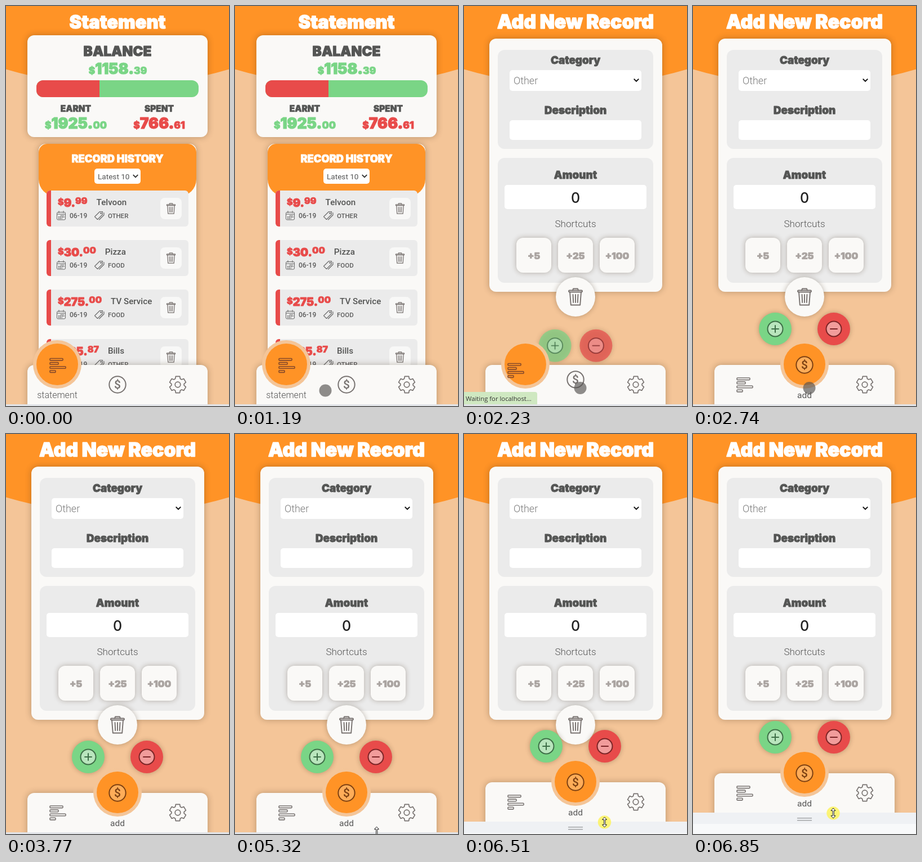
These frames come from a looping animation (396x711 px, 8000 ms). An HTML page with a canvas:

```html
<!DOCTYPE html>
<html lang="en">
<head>
<meta charset="utf-8">
<title>Budget tracker</title>
<style>
html, body { margin: 0; width: 100%; height: 100%; overflow: hidden; background: #f5c598; }
canvas { display: block; width: 396px; height: 711px; }
</style>
</head>
<body>
<canvas id="stage" width="396" height="711"></canvas>
<script>
const ctx = document.getElementById('stage').getContext('2d');
const LOOP = 8000;
const ORANGE = '#ff9326', PEACH = '#f4c598', PAPER = '#faf9f7', PANEL = '#ebebeb';
const RED = '#e84b4a', GREEN = '#7ad586', DARK = '#545554', ICON = '#777270';
const HEAVY = 'Inter, sans-serif', BODY = 'Roboto, sans-serif';

// The screen refreshes only at these moments.
const TICKS = [0, 2230, 2390, 2570, 2740, 6000, 6160, 6350, 6510, 6680, 6850];

// Pointer states: time, x, y, kind
const POINTER = [
  [0, 0, 0, ''], [1030, 99.5, 679.5, 'touch'], [1190, 160.5, 683.5, 'touch'],
  [1360, 190.5, 683, 'touch'], [1540, 216.5, 682.5, 'touch'], [1890, 206.5, 678.5, 'touch'],
  [2060, 206, 678.5, 'press'], [2230, 206.5, 679, 'touch'], [3250, 225.5, 686.5, 'touch'],
  [3420, 245.5, 699.5, 'touch'], [3600, 250.5, 704.5, 'touch'], [3770, 0, 0, ''],
  [4620, 253.5, 708, 'resize'], [4800, 253.5, 707.5, 'drag'], [5320, 251.5, 707, 'resize'],
  [5820, 251, 708, 'drag'], [6160, 250, 704, 'drag'], [6350, 250, 697, 'drag'],
  [6510, 249.5, 690, 'drag'], [6680, 249, 680, 'drag'], [6850, 249, 674, 'drag']
];

// How far the bottom edge has been dragged up: time, pixels
const DRAG = [[0, 0], [6000, 1], [6160, 5], [6350, 12], [6510, 19], [6680, 29], [6850, 35]];

const latest = (rows, t) => rows.filter(row => row[0] <= t).pop();
const clamp = v => Math.min(1, Math.max(0, v));
const mix = (a, b, p) => a + (b - a) * p;

function box(x, y, w, h, r, fill, blur = 0) {
  ctx.save();
  ctx.shadowColor = 'rgba(60,40,20,0.32)';
  ctx.shadowBlur = blur;
  ctx.fillStyle = fill;
  ctx.beginPath();
  ctx.roundRect(x, y, w, h, r);
  ctx.fill();
  ctx.restore();
}

function disc(x, y, r, fill, blur = 0) {
  box(x - r, y - r, 2 * r, 2 * r, r, fill, blur);
}

function ring(x, y, r) {
  ctx.beginPath();
  ctx.arc(x, y, r, 0, 2 * Math.PI);
  ctx.stroke();
}

function outline(x, y, w, h, r) {
  ctx.beginPath();
  ctx.roundRect(x, y, w, h, r);
  ctx.stroke();
}

function lines(...paths) {
  ctx.beginPath();
  for (const path of paths) {
    for (let i = 0; i < path.length; i += 2) {
      ctx[i ? 'lineTo' : 'moveTo'](path[i], path[i + 1]);
    }
  }
  ctx.stroke();
}

function text(str, x, y, size, color, weight = 400, align = 'left', family = BODY) {
  ctx.font = `${weight} ${size}px ${family}`;
  ctx.textAlign = align;
  ctx.fillStyle = color;
  ctx.fillText(str, x, y);
}

function heavy(str, x, y, size, color, align = 'center') {
  text(str, x, y, size, color, 900, align, HEAVY);
  ctx.strokeStyle = color;
  ctx.lineWidth = size * 0.045;
  ctx.lineJoin = 'round';
  ctx.strokeText(str, x, y);
  return ctx.measureText(str).width;
}

function heavyWidth(str, size) {
  ctx.font = `900 ${size}px ${HEAVY}`;
  return ctx.measureText(str).width;
}

function money(x, y, whole, cents, color, big, small, lift = 0) {
  x += heavy('$', x, y - lift * 0.6, small, color, 'left');
  x += heavy(whole + '.', x, y, big, color, 'left');
  return x + heavy(cents, x, y - lift, small, color, 'left');
}

function moneyCentred(cx, y, whole, cents, color) {
  const width = heavyWidth('$' + cents, 17.3) + heavyWidth(whole + '.', 26.7);
  money(cx - width / 2, y, whole, cents, color, 26.7, 17.3);
}

// Runs an icon drawing in its own coordinate system around (x, y).
function icon(x, y, color, width, drawing, scale = 1) {
  ctx.save();
  ctx.translate(x, y);
  ctx.scale(scale, scale);
  ctx.strokeStyle = color;
  ctx.lineWidth = width;
  ctx.lineJoin = ctx.lineCap = 'round';
  drawing();
  ctx.restore();
}

function bin() {
  outline(-12, -11.5, 24, 3, 1.2);
  lines([-5, -11.5, -4, -14.5, 4, -14.5, 5, -11.5],
    [-10, -8.5, -8.2, 14.5, 8.2, 14.5, 10, -8.5],
    [-4.5, -4, -3.8, 10], [0, -4, 0, 10], [4.5, -4, 3.8, 10]);
}

function calendar() {
  outline(-7.5, -6, 15, 13.5, 2);
  lines([-7.5, -2.5, 7.5, -2.5], [-4, -8, -4, -5], [4, -8, 4, -5]);
  ctx.setLineDash([2, 1]);
  ctx.lineCap = 'butt';
  ctx.lineWidth = 1.6;
  lines([-1, 0, 5.5, 0], [-5, 2.6, 5.5, 2.6], [-5, 5.2, 2, 5.2]);
}

function tag() {
  lines([-8, 2, 1, -7, 6, -7, 6, -2, -3, 7, -8, 2], [8.5, -5, 8.5, -1, 0, 7.5]);
  ring(3.2, -4.2, 1);
}

function bars() {
  [23, 15, 28, 10].forEach((w, i) => outline(-13, -12 + i * 7.1, w, 3.6, 1));
}

function gear() {
  ctx.beginPath();
  for (let i = 0; i < 6; i++) {
    for (const [offset, r] of [[-23, 11.3], [-14, 15], [14, 15], [23, 11.3]]) {
      const a = (i * 60 - 90 + offset) * Math.PI / 180;
      ctx.lineTo(r * Math.cos(a), r * Math.sin(a));
    }
  }
  ctx.closePath();
  ctx.stroke();
  ring(0, 0, 4.8);
}

function coin() {
  ring(0, 0, 14.7);
  text('$', 0, 7.2, 21, ctx.strokeStyle, 500, 'center');
}

function chevron(x, y, size, color) {
  icon(x, y, color, 2, () => lines([-size, -size / 2, 0, size / 2, size, -size / 2]));
}

function backdrop(title, size) {
  ctx.fillStyle = PEACH;
  ctx.fillRect(0, 0, 396, 711);
  ctx.fillStyle = ORANGE;
  ctx.beginPath();
  ctx.moveTo(0, 0);
  ctx.lineTo(0, 112.5);
  ctx.quadraticCurveTo(198, 171, 396, 112.5);
  ctx.lineTo(396, 0);
  ctx.fill();
  heavy(title, 198, 40, size, '#fff');
}

function record(y, whole, cents, name, kind) {
  box(72, y, 252, 64, 6, PANEL);
  box(72, y, 8, 64, [6, 0, 0, 6], RED);
  const end = money(92, y + 29, whole, cents, RED, 20, 16, 5);
  text(name, end + 16, y + 26, 15.2, DARK, 500);
  icon(98, y + 44.5, '#666', 1, calendar);
  text('06-19', 113, y + 49, 12, '#5c5c5c', 500);
  icon(165.5, y + 44.5, '#666', 1.1, tag);
  text(kind, 181, y + 49, 11.5, '#5c5c5c', 500);
  box(274, y + 13, 38, 38, 8, '#f8f8f7');
  icon(293, y + 32, '#77716f', 2, bin, 0.63);
}

function statementPage() {
  backdrop('Statement', 32.5);
  box(38, 52, 320, 181, 12, PAPER, 12);
  heavy('BALANCE', 198, 89, 24.4, DARK);
  moneyCentred(198.5, 121, '1158', '39', GREEN);
  box(54, 132, 288, 30, 12, GREEN);
  box(54, 132, 112, 30, [12, 0, 0, 12], RED);
  heavy('EARNT', 124, 188, 15.4, DARK);
  heavy('SPENT', 272, 188, 15.4, DARK);
  moneyCentred(124, 218, '1925', '00', GREEN);
  moneyCentred(272, 218, '766', '61', RED);

  box(58, 245, 280, 450, 12, PAPER, 12);
  box(58, 245, 280, 93, [15, 15, 30, 30], ORANGE);
  heavy('RECORD HISTORY', 198, 278, 18.3, '#fff');
  box(157, 289, 82, 27, 5, '#fff');
  text('Latest 10', 163, 308, 13.6, '#555');
  chevron(230, 302.5, 3.7, '#333');

  record(328, '9', '99', 'Telvoon', 'OTHER');
  record(416, '30', '00', 'Pizza', 'FOOD');
  record(504, '275', '00', 'TV Service', 'FOOD');
  record(592, '125', '87', 'Bills', 'OTHER');
}

function addPage(showBin) {
  backdrop('Add New Record', 33.8);
  box(45, 58, 307, 450, 12, PAPER, 12);
  box(60, 78, 276, 176, 12, PANEL);
  box(60, 270, 276, 222, 12, PANEL);
  heavy('Category', 198, 103, 18.8, DARK);
  box(81, 114, 234, 37, 5, '#fff');
  text('Other', 88, 139, 18, '#7a7a7a', 300);
  chevron(306, 132, 3.7, '#111');
  heavy('Description', 198, 192, 18.8, DARK);
  box(81, 203, 234, 35, 5, '#fff');
  heavy('Amount', 198, 307, 18.8, DARK);
  box(72, 318, 252, 43, 5, '#fff');
  text('0', 198, 350, 25, '#222', 500, 'center', HEAVY);
  text('Shortcuts', 198, 393, 17.1, '#555', 300, 'center');
  ['+5', '+25', '+100'].forEach((label, i) => {
    box(93 + i * 74, 412, 62, 62, 12, PAPER, 10);
    heavy(label, 124 + i * 74, 450, 16.6, '#aaa4a1');
  });
  if (showBin) {
    disc(198, 517, 35, PAPER, 10);
    icon(198, 517, '#77716f', 1.9, bin);
  }
}

function signButton(x, y, fill, inner, ink, plus) {
  disc(x, y, 29, fill, 9);
  disc(x, y, 13.5, inner);
  icon(x, y, ink, 2, () => {
    ring(0, 0, 13.5);
    lines([-6, 0, 6, 0]);
    if (plus) lines([0, -6, 0, 6]);
  });
}

function signButtons(p) {
  const y = mix(673, 574, p);
  ctx.globalAlpha = p;
  signButton(198 - 52 * p, y, GREEN, '#b9e5bd', '#3e6e47', true);
  signButton(198 + 52 * p, y, RED, '#f19c9b', '#7b2527', false);
  ctx.globalAlpha = 1;
}

function navBar(slide, rise, addShown) {
  box(38, 638, 320, 100, [12, 12, 0, 0], PAPER, 12);
  const x = mix(91, 198, slide);
  const addActive = slide > 0.5;
  const coinY = mix(673, 638, rise);
  disc(x, 637, 43, PEACH);
  disc(x, 637, 37, ORANGE);
  icon(91, mix(638.5, 673, rise), addActive ? ICON : '#85492a', 1.6, bars);
  if (addActive) disc(198, coinY, 14, '#ffad59');
  icon(198, coinY, addActive ? '#7b4013' : ICON, 2, coin);
  icon(305, 673, ICON, 1.7, gear);
  if (!addShown) {
    text('statement', 91, 697, 16, '#555', 300, 'center');
  } else if (addActive) {
    ctx.globalAlpha = slide;
    text('add', 198, 697, 15.5, '#555', 400, 'center');
    ctx.globalAlpha = 1;
  }
}

function browserEdge(lift) {
  const y = 708 - lift;
  ctx.fillStyle = lift ? '#eff1f4' : '#e2e4e8';
  ctx.fillRect(0, y, 396, 20);
  ctx.fillStyle = '#f8f9fa';
  ctx.fillRect(0, y + 20, 396, 40);
  ctx.fillStyle = '#a3a5a8';
  ctx.fillRect(185, y + 9, 26, 1.5);
  ctx.fillRect(185, y + 13, 26, 1.5);
}

function resizeArrow() {
  ctx.beginPath();
  for (const side of [1, -1]) {
    for (const [x, y] of [[-1.3, -4.5], [-4, -4.5], [0, -9], [4, -4.5], [1.3, -4.5]]) {
      ctx.lineTo(x * side, y * side);
    }
  }
  ctx.closePath();
  ctx.fillStyle = '#fff';
  ctx.fill();
  ctx.stroke();
}

function pointer([, x, y, kind]) {
  if (kind === 'touch') disc(x, y, 11, 'rgba(85,82,80,0.65)');
  if (kind === 'press') disc(x, y, 11.5, 'rgba(198,188,35,0.85)');
  if (kind === 'drag') disc(x, y, 11.7, 'rgba(253,243,95,0.85)');
  if (kind === 'drag' || kind === 'resize') icon(x, y, '#222', 1, resizeArrow);
}

function draw(now) {
  const clock = now % LOOP;
  const t = TICKS.filter(tick => tick <= clock).pop();
  const lift = latest(DRAG, t)[1];
  const addShown = t >= 2230;
  const run = clamp((t - 2100) / 500);
  const slide = run * run * (3 - 2 * run);
  const pop = 1 - (1 - run) ** 4;

  if (addShown) addPage(t < 6680);
  else statementPage();

  ctx.save();
  ctx.translate(0, -lift);
  if (addShown) signButtons(pop);
  navBar(slide, run, addShown);
  ctx.restore();

  browserEdge(lift);
  if (addShown && t < 2570) {
    box(0, 686, 130, 22, [0, 4, 0, 0], '#cfe8c1');
    text('Waiting for localhost...', 3, 702, 11.3, '#333', 400, 'left', '"Open Sans", sans-serif');
  }
  pointer(latest(POINTER, clock));
}

const start = performance.now();
function frame() {
  draw(performance.now() - start);
  requestAnimationFrame(frame);
}
frame();
</script>
</body>
</html>
```
